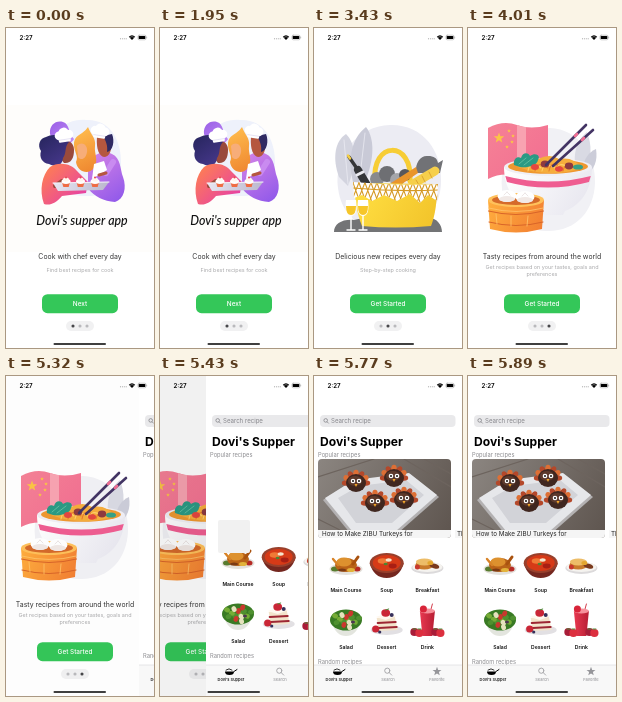
These frames come from a looping animation (148x320 px, 5930 ms). An HTML page with a canvas:

```html
<!DOCTYPE html>
<html lang="en">
<head>
<meta charset="utf-8">
<title>Recipe app walkthrough</title>
<style>
html, body { margin: 0; width: 100%; height: 100%; overflow: hidden; background: #fff; }
canvas { display: block; width: 100vw; height: 100vh; }
</style>
</head>
<body>
<canvas id="stage"></canvas>
<script>
const W = 148, H = 320, LOOP = 5930;
const stage = document.getElementById('stage');
const scale = Math.max(1, innerWidth / W) * (window.devicePixelRatio || 1);
let c;

function setup(canvas) {
  canvas.width = Math.round(W * scale);
  canvas.height = Math.round(H * scale);
  const g = canvas.getContext('2d');
  g.scale(scale, scale);
  return g;
}

function layer(draw) {
  const canvas = document.createElement('canvas');
  c = setup(canvas);
  c.fillStyle = '#fff';
  c.fillRect(0, 0, W, H);
  draw();
  return canvas;
}

// Drawing helpers
function shape(fill, d) {
  c.fillStyle = fill;
  c.fill(new Path2D(d));
}
function line(color, width, d) {
  c.strokeStyle = color;
  c.lineWidth = width;
  c.lineCap = c.lineJoin = 'round';
  c.stroke(new Path2D(d));
}
function oval(fill, x, y, rx, ry = rx, turn = 0) {
  c.fillStyle = fill;
  c.beginPath();
  c.ellipse(x, y, rx, ry, turn, 0, Math.PI * 2);
  c.fill();
}
function box(fill, x, y, w, h, r = 0) {
  c.fillStyle = fill;
  c.beginPath();
  c.roundRect(x, y, w, h, r);
  c.fill();
}
function fade(x0, y0, x1, y1, a, b) {
  const g = c.createLinearGradient(x0, y0, x1, y1);
  g.addColorStop(0, a);
  g.addColorStop(1, b);
  return g;
}
function label(str, x, y, size, color, weight = 400, align = 'center', family = 'Inter, sans-serif') {
  c.font = `${weight} ${size}px ${family}`;
  c.textAlign = align;
  c.fillStyle = color;
  c.fillText(str, x, y);
}
function star(color, x, y, r) {
  c.fillStyle = color;
  c.beginPath();
  for (let i = 0; i < 10; i++) {
    const a = i * Math.PI / 5 - Math.PI / 2, d = i % 2 ? r * 0.42 : r;
    c.lineTo(x + Math.cos(a) * d, y + Math.sin(a) * d);
  }
  c.fill();
}
function lens(color, x, y, r) {
  c.strokeStyle = color;
  c.lineWidth = 0.8;
  c.beginPath();
  c.arc(x, y, r, 0, Math.PI * 2);
  c.moveTo(x + r * 0.7, y + r * 0.7);
  c.lineTo(x + r * 1.7, y + r * 1.7);
  c.stroke();
}

// Onboarding pages
function page(index, title, sub, button) {
  label(title, 74, 231.1, 6.92, '#333');
  const top = sub.length > 1 ? 241 : 243.5;
  sub.forEach((s, i) => label(s, 74, top + i * 6.6, 5.45, '#a9a9ab'));
  box('#34c759', 36, 266.2, 76, 19, 5.5);
  label(button, 74, 278.2, 6.4, '#fff', 500);
  box('#f1f1f2', 60, 293, 28, 10, 5);
  for (let i = 0; i < 3; i++) oval(i === index ? '#47474a' : '#b9b9bc', 67 + i * 7, 298, 1.55);
}

function chefHat(x, y, turn) {
  c.save();
  c.translate(x, y);
  c.rotate(turn);
  oval('#fff', -5, 0, 4.4);
  oval('#fff', 5, 0, 4.4);
  oval('#fff', 0, -2, 5.4);
  box('#fff', -6, 0, 12, 7, 1);
  line('#d8d3ee', 0.6, 'M-5.5 4.5L5.5 4.5');
  c.restore();
}

function cupcake(x, y) {
  shape('#ef6d45', `M${x - 4} ${y}L${x + 4} ${y}L${x + 2.7} ${y + 5}L${x - 2.7} ${y + 5}Z`);
  oval('#fff', x, y - 0.5, 4.5, 2.4);
  oval('#fff6ee', x, y - 2.5, 3, 2);
  oval('#e5484d', x, y - 4.6, 1);
}

function chefs() {
  box('#fefdfb', 0, 77, W, 147);
  shape('#eef1fb',
    'M44 130C41 106 60 90 80 92C104 91 116 112 115 137C114 160 98 169 78 168C55 168 46 151 44 130Z');
  shape(fade(44, 93, 66, 118, '#9a5fe6', '#c08df5'),
    'M44 106C43 97 50 92 57 94C64 96 62 105 68 111C64 119 48 118 44 106Z');
  // right cook
  shape(fade(84, 124, 118, 172, '#d684e6', '#8f58ea'),
    'M82 137C87 125 98 122 106 126C115 130 114 141 117 149C121 160 118 171 109 174C98 173 88 169 82 160Z');
  shape('#b5573f', 'M91 109L105 109C106 117 106 127 99 129C93 129 90 121 91 109Z');
  shape('#2f2a63', 'M97 108L106 106C109 113 107 123 101 124C102 118 100 113 97 108Z');
  chefHat(94, 103, 0.15);
  // fair hair between the two
  shape(fade(72, 100, 90, 138, '#ffbd4e', '#f08b32'),
    'M68 117C68 106 76 108 82 99C85 107 90 110 89 118C88 126 93 132 88 140C82 148 71 143 70 134C73 128 68 124 68 117Z');
  shape('#f7ad79', 'M71 118C75 113 82 116 81 124C80 131 75 133 72 129Z');
  // left cook
  shape('#9a4a3c', 'M55 114C61 111 68 114 68 122C68 130 65 136 58 135C53 130 53 121 55 114Z');
  shape(fade(36, 108, 60, 142, '#28265f', '#4b3a92'),
    'M40 109C47 105 57 107 63 114C58 119 61 125 57 130C56 139 49 139 43 136C36 135 33 129 35 123C31 117 34 110 40 109Z');
  shape(fade(40, 136, 76, 172, '#ff8150', '#e63fa6'),
    'M38 176C33 162 36 147 44 139C53 133 66 136 71 143L82 154L80 165L56 168C50 175 44 178 38 176Z');
  chefHat(58, 107, -0.15);
  // arms and piping bag
  line('#9a4a3c', 4, 'M56 153L49 158');
  line('#c98bf0', 6, 'M107 134L100 145');
  shape('#fff', 'M88 136L98 133L101 142L86 151Z');
  line('#b5573f', 3, 'M100 145L93 147');
  shape(fade(50, 153, 104, 162, '#e6e4f0', '#b9b6cc'), 'M47 155L103 154L97 162L52 163Z');
  line('#f6f5fb', 1, 'M47 155L103 154');
  cupcake(60, 154);
  cupcake(74.5, 154);
  cupcake(89, 154);
  label("Dovi's supper app", 76, 197, 12.4, '#111', 'italic 500', 'center', 'Lato, sans-serif');
  page(0, 'Cook with chef every day', ['Find best recipes for cook'], 'Next');
}

function wineGlass(x) {
  shape('#fff', `M${x - 5} 172L${x + 5} 172Q${x + 7} 188 ${x} 188Q${x - 7} 188 ${x - 5} 172Z`);
  shape('#f6c629', `M${x - 5} 178L${x + 5} 178Q${x + 5} 187 ${x} 187Q${x - 5} 187 ${x - 5} 178Z`);
  line('#fff', 1.4, `M${x} 188L${x} 201M${x - 4} 202L${x + 4} 202`);
}

function picnic() {
  shape('#ececf3', 'M24 160C20 130 42 98 76 97C108 96 128 122 127 153C127 180 110 202 76 203C44 203 27 185 24 160Z');
  shape('#d3d4df', 'M25 149C18 130 21 113 32 106C42 116 43 134 34 158Z');
  shape('#c9cad7', 'M39 154C33 130 38 110 52 99C62 112 60 136 48 160Z');
  line('#eeeef5', 0.7, 'M30 112L34 156M51 105L45 157');
  shape('#737476', 'M20 204C20 196 28 191 40 192C62 187 92 188 115 190C123 190 128 197 128 204Z');
  line('#f7cd35', 5, 'M61 154C57 112 99 112 96 153');
  shape('#717276', 'M102 145C101 134 107 127 114 128C120 128 123 130 124 135L129 132L126 145Z');
  line('#343539', 8, 'M44 142L53 157');
  line('#343539', 3.4, 'M35 129L44 142');
  line('#f5cf45', 2.5, 'M34 127.5L36 130.5');
  line('#e9e9ef', 3, 'M43 147L49 144');
  oval('#88898d', 63, 151, 7);
  oval('#6e6f73', 73, 146, 8);
  oval('#a4a5aa', 83, 152, 7);
  oval('#57585c', 91, 147, 6);
  shape('#e9952b', 'M77 155L102 139L104 145L85 158Z');
  line('#f6cf4b', 9, 'M99 156L121 143');
  line('#dda52f', 1, 'M102 152L105 157M108 148L111 154M115 144L118 150');
  shape(fade(45, 158, 120, 200, '#ffdf42', '#f2c32a'),
    'M41 155L122 156C124 171 121 188 117 198Q81 201 48 198C43 186 40 170 41 155Z');
  const cloth = 'M39 154Q82 158 124 156L123 173L114 167L106 175L96 166L83 173L70 167L58 173L48 167L40 170Z';
  shape('#fff', cloth);
  c.save();
  c.clip(new Path2D(cloth));
  for (let x = 20; x < 145; x += 6) {
    line('#d59925', 1.1, `M${x} 152L${x + 9} 177M${x + 8} 152L${x - 2} 177`);
  }
  line('#d59925', 1.1, 'M39 160Q82 164 124 162');
  c.restore();
  wineGlass(37);
  wineGlass(49);
  page(1, 'Delicious new recipes every day', ['Step-by-step cooking'], 'Get Started');
}

function bun(x, y) {
  oval('#fff', x, y, 9.5, 6);
  oval('#f1e9e6', x, y + 3, 8, 3);
  line('#ded4d3', 0.6, `M${x} ${y - 4}L${x - 3} ${y - 1}M${x} ${y - 4}L${x + 3} ${y - 1}`);
}

function worldFood() {
  shape('#f1f1f5', 'M34 161C31 130 51 101 82 100C111 101 128 128 127 155C126 183 108 204 78 203C52 202 37 188 34 161Z');
  shape('#d9dae3', 'M108 142C104 124 110 111 119 104C124 117 124 130 117 143Z');
  shape('#cccdd9', 'M114 143C116 130 121 124 128 121C130 133 126 141 119 147Z');
  shape(fade(20, 96, 80, 150, '#f58296', '#f26d91'), 'M20 100Q35 92 49 97T80 97L80 148Q64 152 49 148T20 151Z');
  shape('#f8a3b1', 'M49 97Q54 99 58 99L58 149Q53 149 49 148Z');
  star('#fbc545', 31, 110, 5.5);
  [[41, 103], [45, 108], [44, 114], [39, 119]].forEach(([x, y]) => star('#fbc545', x, y, 2));
  // bowl
  shape(fade(40, 140, 120, 185, '#ffffff', '#e6e5ee'),
    'M36 139L124 139C124 160 114 177 97 183L95 187L65 187L63 183C47 177 36 160 36 139Z');
  shape('#ef5d91', 'M37.3 148Q80 159 122.8 148L121 154Q80 165 39 154Z');
  oval('#f0eff5', 80, 139, 44, 9);
  oval('#ef9830', 80, 138.5, 40, 7.2);
  shape('#f6ad3c', 'M50 139Q58 127 70 131Q82 125 91 131Q105 128 114 140Q82 151 50 139Z');
  for (let i = 0; i < 6; i++) {
    const x = 60 + i * 7;
    line(i % 2 ? '#e77a2c' : '#ffd06a', 1.1, `M${x} 143Q${x + 2} ${131 + i % 3} ${x + 13} 140`);
  }
  shape('#2b9a84', 'M46 137C45 130 50 128 53 130C55 123 61 125 62 128C68 124 73 128 70 132C69 138 59 140 52 139Z');
  line('#6bc7a6', 0.8, 'M51 136L58 130M56 137L65 130');
  oval('#e5473f', 67, 139, 4, 3);
  oval('#8f3a3f', 77, 136, 4.3, 3.5);
  oval('#e5473f', 91, 141, 4, 2.8);
  oval('#8f3a3f', 101, 138, 4.2, 3.4);
  oval('#35a187', 110, 139, 5, 2.6);
  line('#433464', 2.6, 'M78 137L118 97M85 138L125 102');
  line('#ef6c91', 2.7, 'M107 108L109 106M114 112L116 110');
  // steamer
  shape(fade(20, 175, 76, 202, '#ffad3d', '#f27d32'), 'M20 172L76 172L74 201Q48 208 22 201Z');
  oval('#ffc15b', 48, 172, 28, 7);
  oval('#d56a2a', 48, 172, 24, 5);
  bun(39, 168);
  bun(57, 169);
  line('#d96529', 1.1, 'M20.5 183Q48 190 75.5 183M21 194Q48 201 75 194');
  line('#ffc66c', 0.8, 'M20.5 180Q48 187 75.5 180M28 186L29 196M43 188L43 198M60 188L59 198');
  page(2, 'Tasty recipes from around the world',
    ['Get recipes based on your tastes, goals and', 'preferences'], 'Get Started');
}

// Home screen
const dishes = {
  'Main Course'(x, y) {
    oval('#e4e1dc', x, y + 4, 16.5, 6);
    oval('#587c2f', x - 11, y + 4, 4, 2.5);
    oval('#b62b25', x + 11, y + 4, 3.5, 2.5);
    oval('#b96318', x, y, 11, 7);
    oval('#dd912e', x - 2, y - 3, 7.5, 4.6);
    line('#a9520f', 3, `M${x + 7} ${y - 1}L${x + 12} ${y - 8}`);
    line('#d88328', 2.4, `M${x - 8} ${y}L${x - 13} ${y - 6}`);
    oval('#e2b33b', x + 5, y + 5, 4, 2);
    oval('#7b3a14', x - 4, y + 5, 4, 1.6);
  },
  Soup(x, y) {
    shape('#74271f', `M${x - 17} ${y - 2}Q${x - 13} ${y + 13} ${x} ${y + 13}Q${x + 13} ${y + 13} ${x + 17} ${y - 2}Z`);
    oval('#98402c', x, y - 2, 17, 10);
    oval('#d63a17', x, y - 2, 14, 8);
    oval('#f07a36', x - 4, y - 4, 5, 2.8);
    oval('#a81f14', x + 6, y + 1, 4, 2.4);
    oval('#f6e5cb', x + 2, y - 5, 3, 1.7);
    oval('#4b8732', x - 1, y - 1, 2, 1.2);
  },
  Breakfast(x, y) {
    oval('#dcdadb', x, y + 3, 16, 6);
    oval('#f5f3ef', x, y + 2, 15, 5);
    oval('#c97b2b', x - 3, y, 9, 4.6);
    oval('#edbd68', x - 3, y - 3, 8.5, 3.4);
    oval('#7a3a1d', x + 7, y + 1, 5, 2.4, 0.3);
    oval('#c83a2e', x - 10, y + 2, 2.5);
    oval('#e3a62e', x + 3, y - 2, 3, 2);
  },
  Salad(x, y) {
    shape('#e3e5de', `M${x - 14} ${y + 1}L${x + 14} ${y + 1}Q${x + 10} ${y + 14} ${x} ${y + 14}Q${x - 10} ${y + 14} ${x - 14} ${y + 1}Z`);
    oval('#397a24', x, y - 2, 16, 10.5);
    for (let i = 0; i < 14; i++) {
      const a = i * 2.4, d = 3 + i * 0.8;
      oval(['#76ac36', '#4f9130', '#c9382d', '#e5e3bd'][i % 4],
        x + Math.cos(a) * d, y - 2 + Math.sin(a) * d * 0.65, 3, 2.4, a);
    }
    oval('#4c3652', x + 7, y, 2, 1.6);
  },
  Dessert(x, y) {
    oval('#e2e0e3', x, y + 8, 16, 5);
    shape('#f3e4cc', `M${x - 10} ${y - 4}L${x + 8} ${y - 6}L${x + 11} ${y + 8}L${x - 8} ${y + 9}Z`);
    line('#9d2733', 2, `M${x - 9} ${y + 1}L${x + 9} ${y}M${x - 8} ${y + 6}L${x + 10} ${y + 5}`);
    shape('#fff8ee', `M${x - 11} ${y - 5}L${x + 1} ${y - 9}L${x + 10} ${y - 6}L${x - 1} ${y - 2}Z`);
    oval('#ca2636', x - 1, y - 9, 4.4, 3.7);
    oval('#37305a', x + 5, y - 7, 2);
    oval('#ca2636', x - 11, y + 7, 3.6);
    oval('#37305a', x - 7, y + 10, 1.6);
    line('#4a8a35', 1, `M${x - 1} ${y - 12}L${x + 2} ${y - 13}`);
  },
  Drink(x, y) {
    line('#d23b4a', 1, `M${x + 2} ${y - 7}L${x + 5} ${y - 18}`);
    shape(fade(x - 7, y, x + 7, y, '#e6384f', '#b91f35'),
      `M${x - 7.5} ${y - 11}L${x + 7.5} ${y - 11}L${x + 5} ${y + 14}L${x - 5} ${y + 14}Z`);
    oval('#f6919b', x, y - 11, 7.5, 2.4);
    oval('#d82439', x - 4, y - 13, 3.5);
    [-13, -8, 8, 13].forEach((d, i) => {
      oval(i % 2 ? '#dc2f3f' : '#a81c38', x + d, y + 10 + i % 2, 4.1, 4);
      line('#4b8d38', 1, `M${x + d - 1.5} ${y + 7}L${x + d + 1.5} ${y + 7}`);
    });
  }
};

function turkey(x, y) {
  for (let i = 0; i < 7; i++) {
    const a = Math.PI * (1 + i / 6);
    oval(i % 2 ? '#dd6f35' : '#b4482a', x + Math.cos(a) * 10, y + Math.sin(a) * 9, 4.2, 2.8, a);
  }
  oval('#402720', x, y, 10, 9);
  oval('#5d3a2c', x - 1, y - 2, 7, 5);
  [-3, 3].forEach(d => {
    oval('#fff', x + d, y - 2, 2.3);
    oval('#171412', x + d, y - 2, 1);
  });
  shape('#f2a72b', `M${x - 1.5} ${y + 1}L${x + 1.5} ${y + 1}L${x} ${y + 4}Z`);
}

function photoCard() {
  c.save();
  c.beginPath();
  c.roundRect(4, 83, 133, 79, 4);
  c.clip();
  box(fade(4, 83, 137, 153, '#8b8580', '#5f5650'), 4, 83, 133, 79);
  line('#6d645e', 1.2, 'M4 101L60 83M90 83L137 111M110 83L137 98M4 143L26 154');
  shape('#b3b1b2', 'M9 124L38 105L96 98L125 121L84 157L36 157Z');
  shape('#e6e7ea', 'M11 122L40 104L95 97L123 119L82 155L38 155Z');
  shape('#d2d3d8', 'M24 122L45 110L92 104L110 119L78 147L42 147Z');
  turkey(42, 107);
  turkey(80, 102);
  turkey(61, 127);
  turkey(90, 124);
  box('#f5f5f5', 4, 154, 133, 8);
  c.restore();
  label('How to Make ZIBU Turkeys for', 8, 160.2, 6.3, '#242424', 400, 'left');
  box('#f6f6f6', 141, 154, 7, 8);
  label('Th', 143, 160.2, 6.3, '#242424', 400, 'left');
}

function home(loaded) {
  box('#e9e9eb', 6, 39, 135.5, 12, 4);
  lens('#85858a', 11.7, 44.4, 1.8);
  label('Search recipe', 17, 47.3, 6.1, '#85858a', 400, 'left');
  label("Dovi's Supper", 6, 69.8, 12.1, '#000', 700, 'left');
  label('Popular recipes', 4, 81.3, 5.75, '#8b8b8f', 400, 'left');
  if (loaded) photoCard();
  const drop = loaded ? 6 : 0;
  Object.keys(dishes).forEach((name, i) => {
    const x = 32 + (i % 3) * 40.7, y = 183 + Math.floor(i / 3) * 57 + drop;
    dishes[name](x, y);
    label(name, x, y + 27, 5.1, '#111', 600);
  });
  label('Random recipes', 4, 282 + drop, 5.75, '#8b8b8f', 400, 'left');
  tabBar();
}

function tabBar() {
  box('#f8f8f8', 0, 289, W, 31);
  box('#d0d0d2', 0, 288.7, W, 0.5);
  shape('#000', 'M19 295.5L28 295.5Q28 299 23.5 299Q19 299 19 295.5Z');
  line('#000', 1, 'M28 295.5L31 293.5');
  line('#000', 0.8, 'M20 294Q23 291.5 26 294');
  lens('#96969a', 73.3, 294.7, 2.6);
  star('#96969a', 123, 295.5, 4.7);
  label("Dovi's Supper", 25, 304.6, 4, '#000', 500);
  label('Search', 74, 304.6, 4, '#96969a', 500);
  label('Favorite', 123, 304.6, 4, '#96969a', 500);
}

function systemBars() {
  label('2:27', 13.4, 12, 6.2, '#000', 600, 'left');
  for (let i = 0; i < 4; i++) oval('#999', 114.5 + i * 1.9, 10.8, 0.55);
  shape('#000', 'M122.8 8.7Q126 5.6 129.2 8.7L126 12Z');
  line('#fff', 0.4, 'M123.8 9.4Q126 7.4 128.2 9.4');
  c.strokeStyle = '#999';
  c.lineWidth = 0.5;
  c.beginPath();
  c.roundRect(132, 7.2, 8, 4.6, 1.2);
  c.stroke();
  box('#000', 132.7, 7.9, 6.6, 3.2, 0.7);
  box('#999', 140.5, 8.7, 0.6, 1.6);
  box('#000', 47.5, 315.2, 52.5, 1.6, 0.8);
}

const pages = [chefs, picnic, worldFood].map(layer);
const homeEmpty = layer(() => home(false));
const homeFull = layer(() => home(true));
const screen = setup(stage);

function put(image, x = 0, alpha = 1) {
  c.globalAlpha = alpha;
  c.drawImage(image, Math.round(x * scale) / scale, 0, W, H);
  c.globalAlpha = 1;
}

function dissolve(t, start, end, steps) {
  if (t < start) return 0;
  if (t >= end) return 1;
  return (Math.floor((t - start) / (end - start) * (steps - 1)) + 1) / steps;
}

const pushTimes = [5320, 5430, 5540, 5650, 5760, 5890];

// Critically damped navigation push, held between steps
function push(t) {
  const at = pushTimes.filter(p => p <= t).pop();
  const k = (at - 5288) / 1000 * 16.9;
  const left = (1 + k) * Math.exp(-k);
  put(pages[2], -0.3 * W * (1 - left));
  box(`rgba(0,0,0,${0.08 * (1 - left)})`, 0, 0, W, H);
  put(at < 5760 ? homeEmpty : homeFull, W * left);
  if (at >= 5430 && at < 5760) box('#f1f1f1', 58, 144, 32, 33, 2);
}

function draw(t) {
  c = screen;
  if (t >= pushTimes[0]) {
    push(t);
  } else {
    put(pages[0]);
    put(pages[1], 0, dissolve(t, 2090, 2440, 4));
    put(pages[2], 0, dissolve(t, 3780, 4010, 3));
  }
  systemBars();
}

const begin = performance.now();
function tick(now) {
  draw(Math.max(0, now - begin) % LOOP);
  requestAnimationFrame(tick);
}
tick(begin);
</script>
</body>
</html>
```
